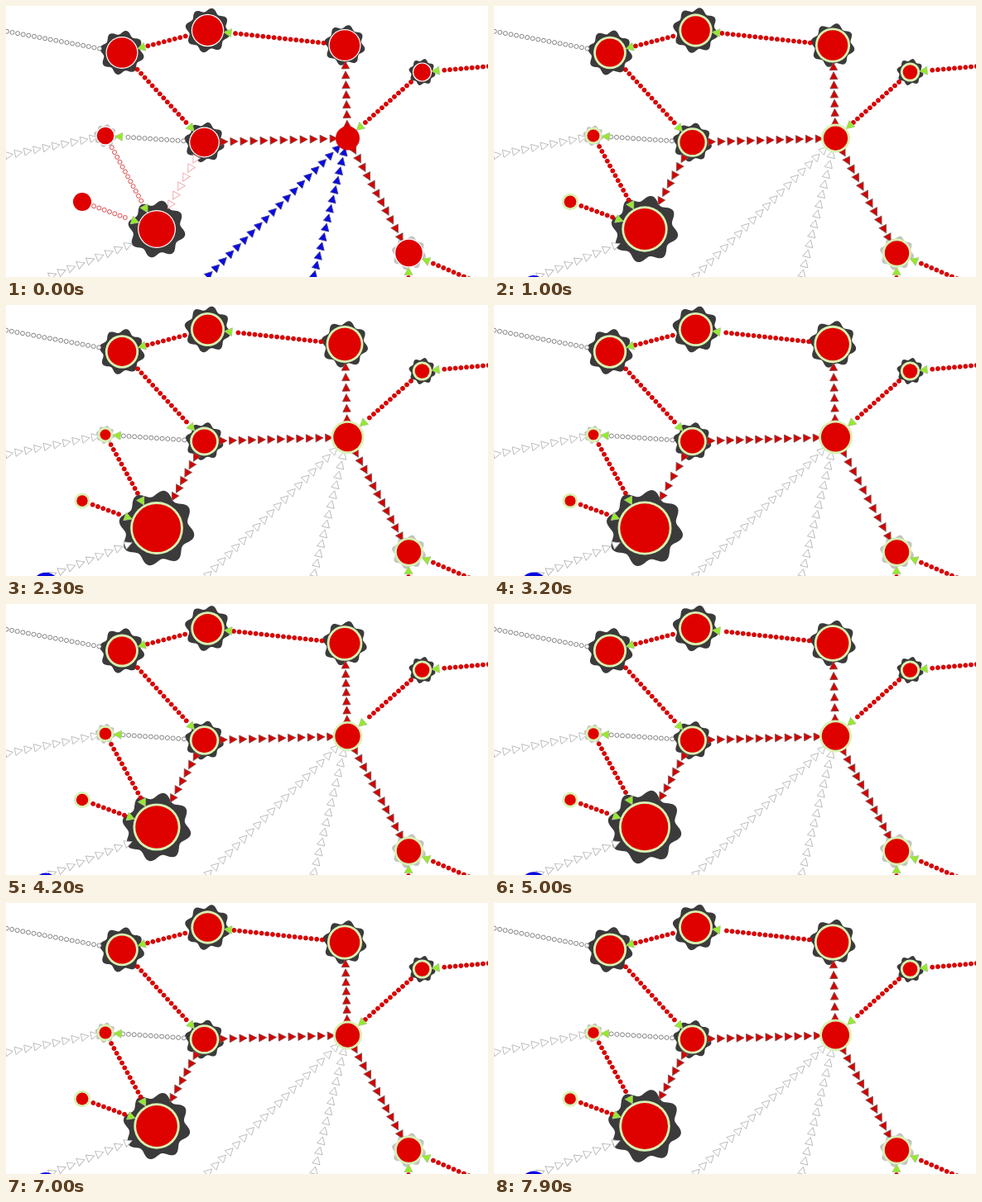
Animation, 582 px wide and 328 px high, one loop 8 s. Source, as an HTML page with a canvas:

```html
<!DOCTYPE html>
<html lang="en">
<head>
<meta charset="utf-8">
<title>Pulsing network</title>
<style>
  html, body { margin: 0; width: 100%; height: 100%; overflow: hidden; background: #fff; }
  canvas { display: block; width: 582px; height: 328px; }
</style>
</head>
<body>
<canvas id="stage"></canvas>
<script>
const WIDTH = 582, HEIGHT = 328, TAU = Math.PI * 2;
const LOOP = 8000, STEP = 100, WARMUP = 1000, PERIOD = 3000;
const TROUGH = 0.45;
const RED = '#df0000', DARK = '#3b3b3b', PALE = '#c3c3c3', BLUE = '#0808e0';
const GLOW = '#d8f1b2', LIME = '#96ea2a';

const canvas = document.getElementById('stage');
const ctx = canvas.getContext('2d');
const ratio = window.devicePixelRatio || 1;
canvas.width = WIDTH * ratio;
canvas.height = HEIGHT * ratio;
ctx.scale(ratio, ratio);

// The radius grows by swing times the level; the gear follows it.
const node = (x, y, base, swing, gearBase = 0, color = DARK) =>
  ({ x, y, base, swing, gearBase, color, fill: RED, radius: base, gear: gearBase });
const point = (x, y) => ({ x, y, radius: 0, gear: 0 });

const hub = node(412.5, 160, 14.5, 6.5);
const north = node(409, 47.5, 19.5, 3.5, 24.8);
const crown = node(243.5, 29.5, 19.7, 1, 27.2);
const west = node(140, 56.5, 19.5, 0.8, 27);
const mid = node(239.5, 165, 18.4, -1.2, 24.5);
const small = node(120, 157, 11.5, -2.6, 14, PALE);
const big = node(182, 270, 23, 10.5, 35);
const lone = node(92, 237, 11, -1.8);
const east = node(502.5, 80, 11.6, 0, 16.2);
const south = node(486.5, 299, 17.5, 0, 20.8, PALE);
const sink = node(48, 340.5, 12, 5.5);
sink.fill = BLUE;
const nodes = [hub, north, crown, west, mid, small, big, lone, east, south, sink];

const style = (fill, line) => ({ fill, line });
const solid = style('#df0000', '#c80000');
const strong = style('#d60000', '#85504c');
const blue = style('#0a0ae2', '#4040a0');
const hollow = style('#fff', '#767676');
const faint = style('#fff', '#b9b9b9');
const rose = style('#fff', '#d4383c');
const pink = style('#fff', '#eea6ac');
const tipStyle = style(LIME, '#a9c985');

const link = (draw, head) => (from, to, look, rest = look) =>
  ({ draw, head, from, to, look, rest });
const dots = link(drawDots, true);
const plainDots = link(drawDots, false);
const chain = link(drawChain, false);

const edges = [
  plainDots(west, point(-14, 28), hollow),
  dots(crown, west, solid),
  dots(north, crown, solid),
  dots(west, mid, solid),
  dots(mid, small, hollow),
  dots(small, big, solid, rose),
  dots(lone, big, solid, rose),
  dots(point(600, 71.5), east, solid),
  dots(east, hub, solid),
  dots(point(575, 337), south, solid),
  dots(point(485, 380), south, solid),
  chain(point(-10, 183), small, faint),
  chain(point(54, 327), point(150, 288.5), faint),
  chain(point(201, 369), hub, faint, blue),
  chain(point(366, 350), hub, faint, blue),
  chain(mid, big, strong, pink),
  chain(mid, hub, strong),
  chain(hub, north, strong),
  chain(hub, south, strong)
];

// Slow rise, then a smooth fall.
function pulse(t) {
  const phase = t % PERIOD / PERIOD, peak = 0.633;
  return phase < peak
    ? Math.pow(phase / peak, 0.85)
    : (1 + Math.cos(Math.PI * (phase - peak) / (1 - peak))) / 2;
}

function levelAt(t) {
  return t < WARMUP
    ? TROUGH * t / WARMUP
    : TROUGH + (1 - TROUGH) * pulse(t - WARMUP);
}

function paint({ fill, line }) {
  ctx.fillStyle = fill;
  ctx.fill();
  ctx.strokeStyle = line;
  ctx.lineWidth = 0.9;
  ctx.stroke();
}

function circle(x, y, r) {
  ctx.beginPath();
  ctx.arc(x, y, r, 0, TAU);
}

function triangle(x, y, angle, front, back, half, look) {
  ctx.save();
  ctx.translate(x, y);
  ctx.rotate(angle);
  ctx.beginPath();
  ctx.moveTo(front, 0);
  ctx.lineTo(-back, -half);
  ctx.lineTo(-back, half);
  ctx.closePath();
  paint(look);
  ctx.restore();
}

function drawGear({ x, y, gear, color }) {
  ctx.beginPath();
  for (let i = 0; i < 128; i++) {
    const a = i / 128 * TAU;
    const r = gear * (0.91 + 0.09 * Math.cos(8 * (a + 1.36)));
    ctx.lineTo(x + r * Math.cos(a), y + r * Math.sin(a));
  }
  ctx.fillStyle = color;
  ctx.fill();
}

function drawDots(at, angle, start, end, look) {
  for (let d = start + 4; d < end; d += 6.7) {
    circle(...at(d), 2.5);
    paint(look);
  }
}

function drawChain(at, angle, start, end, look) {
  const first = start + 2, span = end - 3 - first;
  const count = Math.max(1, Math.round(span / 12));
  for (let i = 0; i <= count; i++) {
    triangle(...at(first + span * i / count), angle, 5.2, 3.8, 4.7, look);
  }
}

function drawEdge({ draw, head, from, to, look, rest }, resting) {
  const dx = to.x - from.x, dy = to.y - from.y;
  const length = Math.hypot(dx, dy), angle = Math.atan2(dy, dx);
  const at = d => [from.x + dx * d / length, from.y + dy * d / length];
  const rim = n => Math.max(n.gear * 0.87, n.radius);
  const tip = length - to.radius;
  const end = head ? tip - 11 : length - rim(to);
  draw(at, angle, rim(from), end, resting ? rest : look);
  if (head) triangle(...at(tip), angle, 0, 9, 5, tipStyle);
}

function drawNode({ x, y, radius, gear, fill }, resting) {
  const border = resting ? 1.2 : 2.8;
  const edge = resting ? '#fff' : GLOW;
  const plain = fill === BLUE || resting && !gear;
  circle(x, y, radius);
  ctx.fillStyle = plain ? fill : edge;
  ctx.fill();
  circle(x, y, radius - border);
  ctx.fillStyle = fill;
  ctx.fill();
}

function draw(t) {
  const resting = t < STEP, level = levelAt(t);
  for (const n of nodes) {
    n.radius = n.base + n.swing * level;
    n.gear = n.gearBase && n.gearBase + 1.25 * n.swing * level;
  }
  ctx.fillStyle = '#fff';
  ctx.fillRect(0, 0, WIDTH, HEIGHT);
  nodes.forEach(drawGear);
  edges.forEach(e => drawEdge(e, resting));
  nodes.forEach(n => drawNode(n, resting));
}

const began = performance.now();
function tick() {
  const t = (performance.now() - began) % LOOP;
  draw(Math.floor(t / STEP) * STEP);
  requestAnimationFrame(tick);
}
tick();
</script>
</body>
</html>
```
